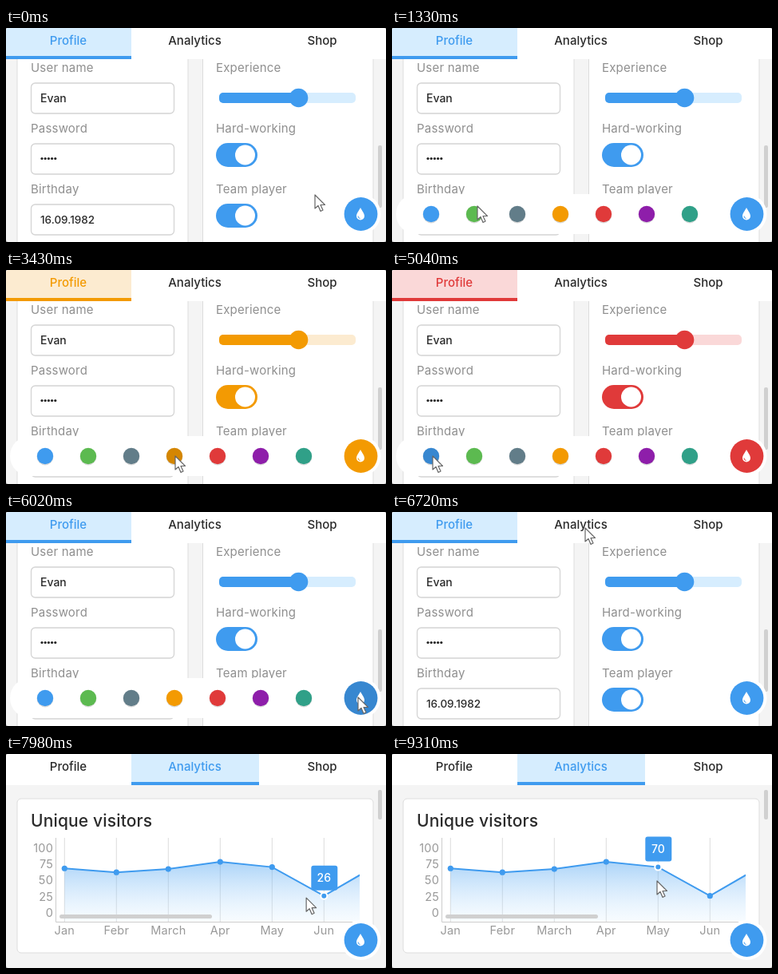
Write an HTML page that moves like this. It is 476 px wide and 268 px high and loops after 9380 ms.

```html
<!DOCTYPE html>
<html lang="en">
<head>
<meta charset="utf-8">
<title>Theme picker</title>
<style>
  html, body { margin: 0; width: 100%; height: 100%; overflow: hidden; background: #999; }
  svg { display: block; width: 476px; height: 268px; border-radius: 3px; background: #f4f4f4; }
  text { font: 500 15px Inter, "Open Sans", sans-serif; fill: #2a2a2a; }
  .label { font-weight: 400; fill: #8f8f8f; letter-spacing: .2px; }
  .value { font-size: 14px; }
  .date { font-size: 13.5px; }
  .title { font-size: 21px; letter-spacing: .15px; }
  .axis { font-weight: 400; font-size: 14.5px; fill: #999; letter-spacing: .2px; }
  .tip { font-size: 14px; fill: #fff; }
  .mid { text-anchor: middle; }
  .end { text-anchor: end; }
  .card { fill: #fff; stroke: #ddd; }
  .input { fill: #fff; stroke: #d4d4d4; stroke-width: 1.3; }
  .bar { fill: #d0d0d0; }
  .theme { fill: var(--main); }
  .light { fill: var(--light); }
  .white { fill: #fff; }
  .grid { stroke: #ddd; }
  .frame { stroke: #ccc; fill: none; }
</style>
</head>
<body>
<svg id="stage" viewBox="0 0 476 268"></svg>
<script>
const LOOP = 9380, STEP = 70, PAGE = 480;
const BLUE = [63, 155, 239], GREEN = [92, 186, 80], SLATE = [98, 125, 137],
      ORANGE = [243, 154, 2], RED = [224, 58, 58], PURPLE = [142, 30, 170], TEAL = [48, 160, 136];
const swatches = [BLUE, GREEN, SLATE, ORANGE, RED, PURPLE, TEAL];
const PALE_BLUE = [214, 237, 254], PALE_GREEN = [222, 241, 220], PALE_SLATE = [224, 229, 231],
      PALE_ORANGE = [252, 235, 208], PALE_RED = [250, 216, 216];
const themes = [
  [0, BLUE, PALE_BLUE], [1450, GREEN, PALE_GREEN], [2400, SLATE, PALE_SLATE],
  [2820, ORANGE, PALE_ORANGE], [3720, RED, PALE_RED], [5040, BLUE, PALE_BLUE]
];
const cursorPath = [
  [70, 387, 209], [500, 440, 232], [950, 440, 232], [1330, 107, 223], [1700, 107, 223],
  [2240, 161, 230], [2480, 161, 230], [2800, 212, 233], [3430, 212, 233], [3720, 267, 232],
  [3880, 267, 232], [4900, 51, 233], [5350, 51, 233], [5900, 441, 232], [6120, 441, 232],
  [6720, 242, 20], [7350, 242, 20], [7910, 408, 183], [8190, 204, 165], [8400, 204, 165],
  [8750, 422, 183], [9170, 381, 165], [9240, 381, 165], [9310, 332, 159]
];
const tips = [[0, -1], [7910, 5], [8050, -1], [8190, 2], [8470, -1], [8680, 5], [9100, 4]];
const months = ["Jan", "Febr", "March", "Apr", "May", "Jun", "Jul"];
const visitors = [68, 62, 67, 78, 70, 26, 72];
const tabs = ["Profile", "Analytics", "Shop"];
const tabEdges = [0, 157, 317, 476];

const clamp = p => Math.max(0, Math.min(1, p));
const span = (t, start, length) => clamp((t - start) / length);
const easeOut = p => 1 - (1 - p) ** 2;
const smooth = p => p * p * (3 - 2 * p);
const mix = (a, b, p) => a.map((v, i) => v + (b[i] - v) * p);
const rgb = c => `rgb(${c.map(Math.round)})`;
const $ = id => document.getElementById(id);

const rect = (cls, x, y, w, h, r = 0, extra = "") =>
  `<rect class="${cls}" x="${x}" y="${y}" width="${w}" height="${h}" rx="${r}" ${extra}/>`;
const circle = (cls, x, y, r, extra = "") =>
  `<circle class="${cls}" cx="${x}" cy="${y}" r="${r}" ${extra}/>`;
const text = (cls, x, y, s, extra = "") => `<text class="${cls}" x="${x}" y="${y}" ${extra}>${s}</text>`;
const line = (cls, x1, y1, x2, y2) => `<path class="${cls}" d="M${x1} ${y1}L${x2} ${y2}"/>`;

const px = i => 73.3 + 65 * i;
const py = v => 199 - .82 * v;
const swatchX = i => 49 + 54 * i;

const field = (label, y) => text("label", 31, y + 55, label) + rect("input", 31.5, y + 69, 179, 38, 5);
const toggle = (label, y) => text("label", 263, y + 55, label) +
  rect("theme", 263, y + 68, 52, 30, 15) + circle("white", 299.5, y + 83, 12.5);

const profile = rect("card", 14, 20, 214, 300) + rect("card", 246.5, 20, 213.5, 300) +
  field("User name", 0) + text("value", 43, 93, "Evan") +
  field("Password", 76) + [0, 1, 2, 3, 4].map(i => circle("", 45 + 4.2 * i, 163.5, 1.6, 'fill="#222"')).join("") +
  field("Birthday", 152) + text("date", 43, 245, "16.09.1982") +
  text("label", 263, 55, "Experience") +
  rect("light", 267, 81, 171, 13, 5) + rect("theme", 267, 81, 99, 13, 5) + circle("theme", 366.5, 87.5, 11.8) +
  toggle("Hard-working", 76) + toggle("Team player", 152) + rect("bar", 466, 147, 5, 78, 2);

const curve = visitors.map((v, i) => `${px(i)} ${py(v)}`).join("L");
const chart = months.map((m, i) => line("grid", px(i), 105, px(i), 210) + text("axis mid", px(i), 226, m)).join("") +
  `<path d="M${px(0)} 209L${curve}V209Z" fill="url(#fade)"/>` +
  `<path d="M${curve}" fill="none" style="stroke:var(--main)" stroke-width="2"/>` +
  visitors.map((v, i) => circle("theme", px(i), py(v), 3.6)).join("");

const analytics = rect("card", 14, 56, 446, 193, 5) + text("title", 31, 91, "Unique visitors") +
  [100, 75, 50, 25, 0].map((v, i) => text("axis end", 59, 122.5 + 20.4 * i, v)).join("") +
  `<g clip-path="url(#plot)">${chart}</g>` + `<path class="frame" d="M62.5 105V210.5H443"/>` +
  rect("bar", 67, 201, 191, 5, 2.5) + rect("bar", 466, 45, 5, 37, 2) +
  `<g id="tip">${circle("theme", 0, 0, 4, 'stroke="#fff" stroke-width="2"')}` +
  rect("theme", -16, -38, 33, 31, 3) + text("tip mid", 0, -17.5, "", 'id="tipText"') + "</g>";

const header = rect("white", 0, 0, 476, 39) + tabs.map((name, i) => {
  const [a, b] = [tabEdges[i], tabEdges[i + 1]];
  return `<g id="tab${i}">${rect("light", a, 0, b - a, 35.5)}${rect("theme", a, 35, b - a, 4)}</g>` +
    text("mid", (a + b) / 2 - .5, 21, name, `id="name${i}"`);
}).join("");

const hover = (x, r) => circle("hover", x, 233, r, `opacity="0" data-x="${x}" data-r="${r}"`);
const palette = `<g clip-path="url(#pill)">${rect("white", 5, 208, 465, 50)}` +
  swatches.map((c, i) => circle("", swatchX(i), 234, 10.4, 'opacity=".15"') +
    circle("", swatchX(i), 233, 10.2, `fill="${rgb(c)}"`) + hover(swatchX(i), 10.2)).join("") + "</g>" +
  circle("theme", 444.5, 233, 20.9) + hover(444.5, 20.9) +
  `<path class="white" d="M444 225C446 229 449 232 449 235.5A5 5 0 0 1 439 235.5C439 232 442 229 444 225Z"/>` +
  `<path d="M441 235.5A3 3 0 0 0 443.5 238.5" fill="none" style="stroke:var(--main)"/>`;

$("stage").innerHTML = `<defs>
  <linearGradient id="fade" gradientUnits="userSpaceOnUse" x1="0" y1="133" x2="0" y2="209">
    <stop offset="0" style="stop-color:var(--main)" stop-opacity=".45"/>
    <stop offset="1" style="stop-color:var(--light)" stop-opacity=".2"/>
  </linearGradient>
  <clipPath id="plot"><rect x="55" y="100" width="388" height="135"/></clipPath>
  <clipPath id="pill"><rect id="pillShape" y="208" height="50" rx="25"/></clipPath></defs>
  <g id="profile">${profile}</g><g id="analytics">${analytics}</g>${header}${palette}
  <path id="cursor" d="M0 0V17L4 13.5L7 20.5L10 19L7 12.5H12.5Z" fill="#fff" stroke="#666" stroke-width="1.2" stroke-linejoin="round"/>`;

const latest = (steps, t) => steps.filter(s => s[0] <= t).pop();
const themeAt = (t, column) =>
  themes.reduce((c, theme) => mix(c, theme[column], span(t, theme[0], 250)), themes[0][column]);

function cursorAt(t) {
  const next = cursorPath.findIndex(k => k[0] > t);
  if (next === 0) return cursorPath[0].slice(1);
  if (next < 0) return cursorPath[cursorPath.length - 1].slice(1);
  const [a, b] = [cursorPath[next - 1], cursorPath[next]];
  return mix(a.slice(1), b.slice(1), smooth(span(t, a[0], b[0] - a[0])));
}

function draw(t) {
  const color = themeAt(t, 1);
  $("stage").style.setProperty("--main", rgb(color));
  $("stage").style.setProperty("--light", rgb(themeAt(t, 2)));

  const slide = easeOut(span(t, 7070, 457));
  $("profile").setAttribute("transform", `translate(${-PAGE * slide})`);
  $("analytics").setAttribute("transform", `translate(${PAGE * (1 - slide)})`);

  const swap = span(t, 7030, 200);
  [1 - swap, swap, 0].forEach((on, i) => {
    $("tab" + i).setAttribute("opacity", on);
    $("name" + i).style.fill = rgb(mix([42, 42, 42], color, on));
  });

  const open = easeOut(span(t, 600, 440)) - easeOut(span(t, 6060, 440));
  $("pillShape").setAttribute("x", 419.5 - 414.5 * open);
  $("pillShape").setAttribute("width", 50 + 414.5 * open);

  const tip = latest(tips, t)[1];
  $("tip").style.display = tip < 0 ? "none" : "";
  if (tip >= 0) {
    $("tip").setAttribute("transform", `translate(${px(tip)} ${py(visitors[tip])})`);
    $("tipText").textContent = visitors[tip];
  }

  const [x, y] = cursorAt(t);
  $("cursor").setAttribute("transform", `translate(${x} ${y})`);
  for (const h of document.querySelectorAll(".hover"))
    h.setAttribute("opacity", Math.hypot(x - h.dataset.x, y - 233) < h.dataset.r - .5 ? .13 : 0);
}

const begin = performance.now();
function tick() {
  const t = (performance.now() - begin) % LOOP;
  draw(Math.floor(t / STEP) * STEP);
  requestAnimationFrame(tick);
}
tick();
</script>
</body>
</html>
```
